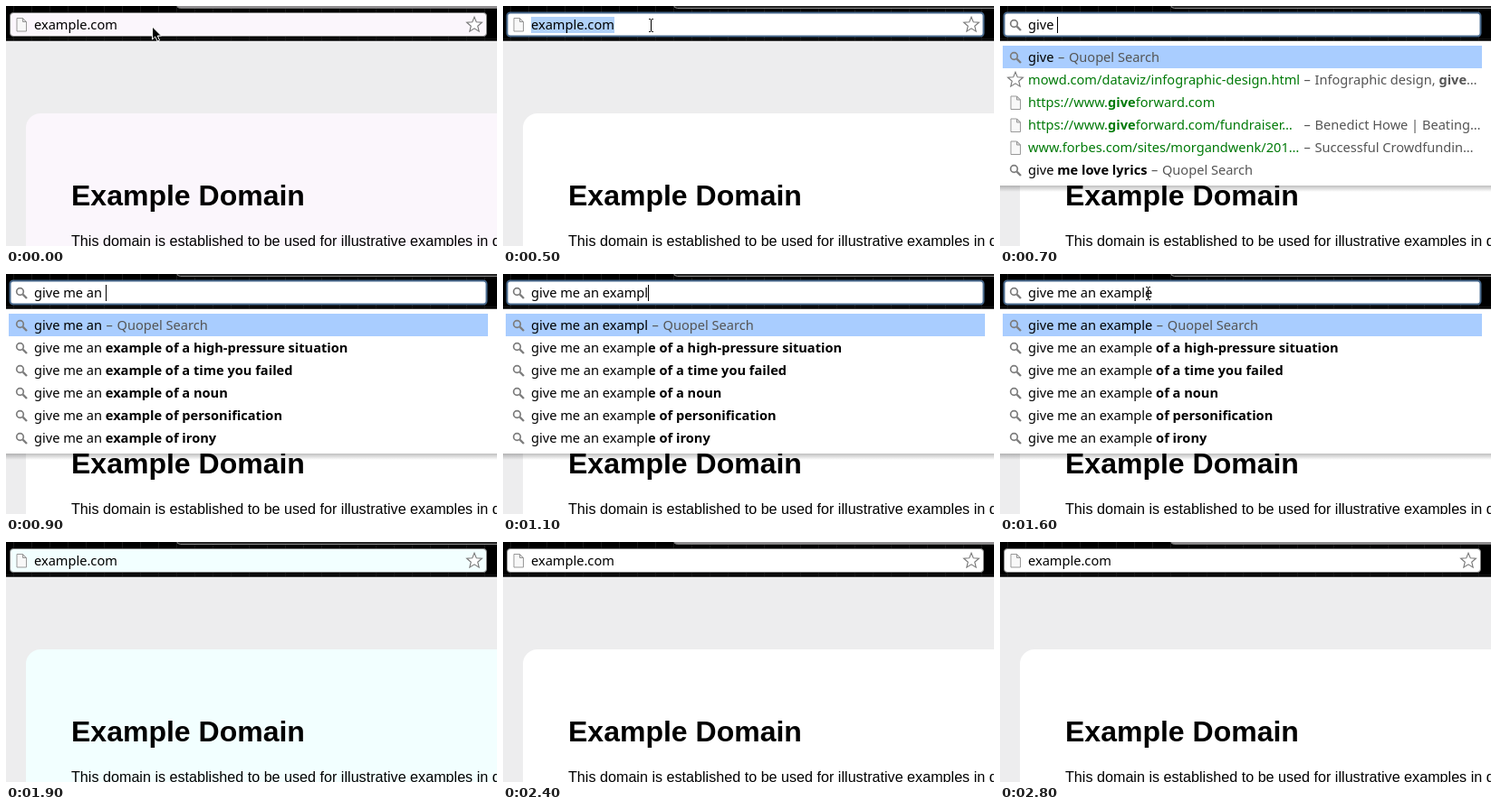
Animation of 542x266 px, one loop 2900 ms. Source, as an HTML page with a canvas:

```html
<!DOCTYPE html>
<html lang="en">
<head>
<meta charset="utf-8">
<title>Address bar search</title>
<style>
html, body { margin: 0; width: 100%; height: 100%; overflow: hidden; background: #000; }
canvas { display: block; width: 542px; height: 266px; }
</style>
</head>
<body>
<canvas id="stage" width="542" height="266"></canvas>
<script>
const W = 542, H = 266, LOOP = 2900;
const ctx = document.getElementById('stage').getContext('2d');

const UI = '14.6px "Noto Sans", sans-serif';
const UI_BOLD = 'bold ' + UI;
const PAGE = '"Liberation Sans", Arial, sans-serif';
const GREEN = '#007a08', GREY = '#555', ICON = '#7d7d7d';
const LEFT = 31, ROW_H = 25, ENGINE = 'Quopel Search';
const PHRASE = 'give me an example';
const ENDINGS = ['a high-pressure situation', 'a time you failed', 'a noun', 'personification', 'irony'];
const TYPED = [2, 5, 8, 11, 14, 17, 18];   // characters after each 100 ms step
const TYPE_START = 600, TYPE_END = 1700;

const SITES = [
  { url: 'mowd.com/dataviz/infographic-design.html', note: 'Infographic design, give…', star: true },
  { url: 'https://www.giveforward.com' },
  { url: 'https://www.giveforward.com/fundraiser…', note: 'Benedict Howe | Beating…' },
  { url: 'www.forbes.com/sites/morgandwenk/201…', note: 'Successful Crowdfundin…' }
];

function rect(x, y, w, h, fill) {
  ctx.fillStyle = fill;
  ctx.fillRect(x, y, w, h);
}

function round(x, y, w, h, r, fill, stroke, line = 1) {
  ctx.beginPath();
  ctx.roundRect(x, y, w, h, r);
  if (fill) { ctx.fillStyle = fill; ctx.fill(); }
  if (stroke) { ctx.strokeStyle = stroke; ctx.lineWidth = line; ctx.stroke(); }
}

function poly(points, fill, stroke, line = 1) {
  ctx.beginPath();
  points.forEach(([x, y]) => ctx.lineTo(x, y));
  ctx.closePath();
  if (fill) { ctx.fillStyle = fill; ctx.fill(); }
  if (stroke) { ctx.strokeStyle = stroke; ctx.lineWidth = line; ctx.stroke(); }
}

// Draws text and returns the x where it ends.
function text(str, x, y, color = '#000', font = UI) {
  ctx.font = font;
  ctx.fillStyle = color;
  ctx.fillText(str, x, y);
  return x + ctx.measureText(str).width;
}

function highlight(str, query, x, y, color) {
  str.split(query).forEach((part, i) => {
    if (i) x = text(query, x, y, color, UI_BOLD);
    x = text(part, x, y, color);
  });
}

function note(str, query, x, y) {
  text('–', x, y, GREY);
  highlight(str, query, x + 12, y, GREY);
}

function star(cx, cy) {
  const pts = [];
  for (let i = 0; i < 10; i++) {
    const r = i % 2 ? 3.9 : 8.8, a = (i / 5 - 0.5) * Math.PI;
    pts.push([cx + r * Math.cos(a), cy + r * Math.sin(a)]);
  }
  poly(pts, '#fff', '#777', 1.1);
}

function sheet(cx, cy) {
  const l = cx - 5, r = cx + 5.5, t = cy - 7, b = cy + 7.5;
  poly([[l, t], [r - 4, t], [r, t + 4], [r, b], [l, b]], '#f8f8f8', '#999');
  poly([[r - 4, t], [r - 4, t + 4], [r, t + 4]], '#ddd', '#999');
}

function lens(cx, cy) {
  ctx.strokeStyle = ICON;
  ctx.lineWidth = 1.7;
  ctx.beginPath();
  ctx.arc(cx - 1.5, cy - 1.5, 3.8, 0, Math.PI * 2);
  ctx.stroke();
  ctx.lineWidth = 2.3;
  ctx.beginPath();
  ctx.moveTo(cx + 1.6, cy + 1.6);
  ctx.lineTo(cx + 6, cy + 6);
  ctx.stroke();
}

function arrow(x, y) {
  poly([[0, 0], [0, 14], [3.2, 11], [5.6, 16], [8, 15], [5.8, 10], [10, 10]]
    .map(([a, b]) => [x + a, y + b]), '#000', '#fff');
}

function beam(x, y) {
  rect(x, y - 6, 1, 13, '#000');
  for (const side of [-1, 1]) {
    rect(x - 2, y + side * 7, 2, 1, '#000');
    rect(x + 1, y + side * 7, 2, 1, '#000');
  }
}

function page(tint) {
  rect(0, 38, W, H - 38, '#ededee');
  round(22, 119, W, H, 16, tint);
  text('Example Domain', 72, 221, '#000', 'bold 32px ' + PAGE);
  text('This domain is established to be used for illustrative examples in documents.',
    72, 266, '#000', '16.15px ' + PAGE);
}

function chrome(filled) {
  rect(0, 0, W, 38, '#000');
  for (let x = 8; x < W; x += 20) rect(x, 0, 1, 38, '#181818');
  rect(0, 36, W, 1, '#141414');
  round(188.5, -8, W, 10.5, 4, filled ? '#8f8d8f' : '#222', filled ? '#777' : '#8a8a8a');
  rect(0, 38, W, 1, '#444');
}

function bar(tint, focused) {
  round(4.5, 7.5, 526, 26, 3.5, tint, focused ? '#47688c' : '#777', focused ? 2 : 1);
}

function dropdown(query) {
  const q = query.trim();
  const shade = ctx.createLinearGradient(0, 199, 0, 206);
  shade.addColorStop(0, 'rgba(0,0,0,.25)');
  shade.addColorStop(1, 'rgba(0,0,0,0)');
  rect(0, 199, W, 7, shade);
  rect(0, 39, W, 160, '#fff');
  rect(3, 44, 529, 25, '#a9cdff');

  const base = row => 62 + row * ROW_H;
  const icon = (draw, row) => draw(17, 57 + row * ROW_H);
  const complete = (full, row) => {
    icon(lens, row);
    const x = text(q, LEFT, base(row));
    return text(full.slice(q.length), x, base(row), '#000', UI_BOLD);
  };

  note(ENGINE, q, complete(q, 0) + 4.5, base(0));
  if (q.length > 4) {
    ENDINGS.forEach((end, i) => complete(`${PHRASE} of ${end}`, i + 1));
    return;
  }
  SITES.forEach((site, i) => {
    const row = i + 1;
    icon(site.star ? star : sheet, row);
    // Only the fundraising host matches the query.
    if (site.url.includes('www.give')) highlight(site.url, q, LEFT, base(row), GREEN);
    else text(site.url, LEFT, base(row), GREEN);
    if (site.note) note(site.note, q, 335.5, base(row));
  });
  note(ENGINE, q, complete('give me love lyrics', 5) + 4.5, base(5));
}

function render(t) {
  const typing = t >= TYPE_START && t < TYPE_END;
  const selected = t >= 400 && t < TYPE_START;
  const tint = t < 100 ? '#fbf6fc' : t >= 1900 && t < 2100 ? '#f2ffff' : '#fff';

  page(tint);
  chrome(t < 100 || t >= 2300);
  bar(tint, selected || typing);

  if (typing) {
    const step = Math.min(TYPED.length - 1, Math.floor((t - TYPE_START) / 100));
    const query = PHRASE.slice(0, TYPED[step]);
    lens(17, 21);
    const end = text(query, LEFT, 26);
    if (t < 1400) rect(Math.round(end), 12, 1, 18, '#000');
    dropdown(query);
  } else {
    if (selected) rect(LEFT, 12, 92, 18, '#b0d1f9');
    sheet(17, 20.5);
    star(517, 21);
    text('example.com', LEFT, 26);
  }

  if (t < 200) arrow(161.5, 23);
  else if (t < TYPE_START || (t >= 1400 && t < TYPE_END)) beam(163, 21);
}

const start = performance.now();
function tick(now) {
  render(Math.max(0, now - start) % LOOP);
  requestAnimationFrame(tick);
}
render(0);
requestAnimationFrame(tick);
</script>
</body>
</html>
```
